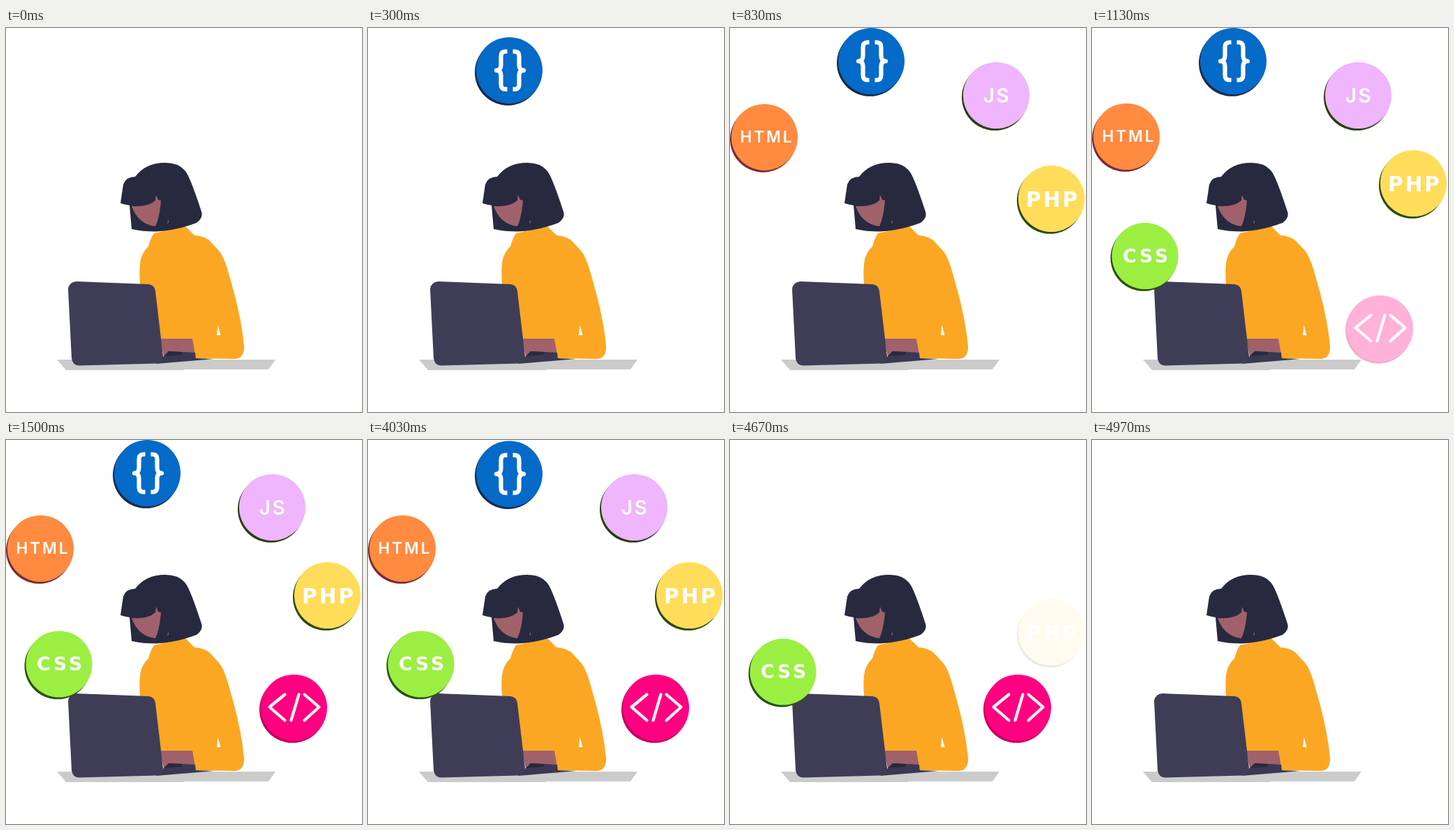
An HTML page that plays this animation: 510 by 550 pixels, repeating every 5.01 s.

```html
<!DOCTYPE html>
<html lang="en">
<head>
<meta charset="utf-8">
<title>Coder at work</title>
<style>
  html, body { margin: 0; width: 100%; height: 100%; overflow: hidden; background: #fff; }
  svg { display: block; width: 510px; height: 550px; }
  text { fill: #fff; font-weight: 700; text-anchor: middle; font-family: "DejaVu Sans", sans-serif; }
  .light { font-weight: 600; font-family: Inter, sans-serif; }
  .icon { fill: none; stroke: #fff; stroke-linejoin: round; }
</style>
</head>
<body>
<svg viewBox="0 0 510 550">
  <path fill="#cbcbcb" d="M73 475H386L376 489H255V490H86Z"/>

  <!-- person -->
  <path fill="#fba724" d="M212 294L257 284L270 297Q283 298 291 304L305 319Q312 327 318 348L327 380Q338 422 341 455Q342 473 328 474L272 473L266 445H222L192 367Q190 340 194 328Q198 318 204 313Q207 301 212 294Z"/>
  <path fill="#fff" d="M303.500 425L302 440H307.500Z"/>
  <path fill="#272a3f" d="M164 251L168 224Q172 213 185 213Q200 193 228 193Q250 193 259 208Q266 220 280 263Q283 272 273 279Q245 290 215 291.500Q195 291.500 180 288L177 254Q170 253 164 251Z"/>
  <path fill="#a0616a" d="M180 255Q203 257 214 247L215 239L218 246L222 247Q220 272 214 284Q189 281 180 255ZM231 280L233 274V279Z"/>

  <!-- laptop -->
  <path fill="#a0616a" d="M221 445H267L271 467L226 471Z"/>
  <path fill="#3b3853" d="M226 470L233 463L271 465L272 473L298 474L215 481Z"/>
  <path fill="#272a3f" d="M226 470L233 463L253 464L251 468Z"/>
  <path fill="#3f3d56" d="M89 374Q90 364 101 363L204 367Q213 368 214 377L225 470Q226 480 215 480.500L105 483.500Q95 483 94 473Z"/>

  <g id="badges"></g>
</svg>
<script>
const LOOP = 5010, DROP = 56;
const ENTER = { start: 147, step: 192, time: 400 };
const LEAVE = { start: 3992, step: 140, time: 265 };

const word = (text, x, y, size, gap, cls = "") =>
  `<text class="${cls}" x="${x}" y="${y}" font-size="${size}" letter-spacing="${gap}">${text}</text>`;
const brace = '<path d="M-4-27h-2.5q-6.5 0-6.500 7v12q0 8-6.500 8q6.500 0 6.500 8v12q0 7 6.500 7h2.500"/>';
const braces = `<g class="icon" stroke-width="6.2" transform="translate(1)">${brace}<g transform="scale(-1 1)">${brace}</g></g>`;
const tag = '<path class="icon" stroke-width="4.2" stroke-linecap="round" d="M-13-19L-35-1L-13 18M7-19L-4 18M15-19L36-1L15 18"/>';

// in order of appearance: centre, face colour, edge colour, label
const badges = [
  [202.5, 47.5, "#056ac8", "#1b2a4a", braces],
  [381.5, 96.5, "#efb5fd", "#26400f", word("JS", 1, 10, 28, 2.5, "light")],
  [49.5, 155.5, "#ff8a40", "#7a2d35", word("HTML", 3.5, 7.5, 22.5, 3, "light")],
  [460.5, 222.5, "#ffdd5a", "#2f4a10", word("PHP", 2, 11, 29.5, 3)],
  [76, 321, "#9bef42", "#2a5213", word("CSS", 2.5, 9, 26.5, 4)],
  [412.5, 383.5, "#ff0080", "#c4005f", tag]
];

const layer = document.getElementById("badges");
layer.innerHTML = badges.map(([, , face, edge, label]) =>
  `<g><circle cx="-2" cy="2.8" r="47.5" fill="${edge}"/><circle r="47.5" fill="${face}"/>${label}</g>`).join("");

const clamp = v => Math.max(0, Math.min(1, v));
const progress = (t, i, phase) => clamp((t - phase.start - i * phase.step) / phase.time);

function draw(now) {
  const t = now % LOOP;
  badges.forEach(([x, y], i) => {
    const rise = (1 - progress(t, i, ENTER)) ** 3;
    const fall = progress(t, i, LEAVE) ** 2;
    const drop = DROP * (rise + fall);
    const g = layer.children[i];
    g.setAttribute("transform", `translate(${x} ${y + drop})`);
    g.setAttribute("opacity", clamp((DROP - drop) / 30));
  });
}

let first;
function tick(now) {
  first ??= now;
  draw(now - first);
  requestAnimationFrame(tick);
}
draw(0);
requestAnimationFrame(tick);
</script>
</body>
</html>
```
